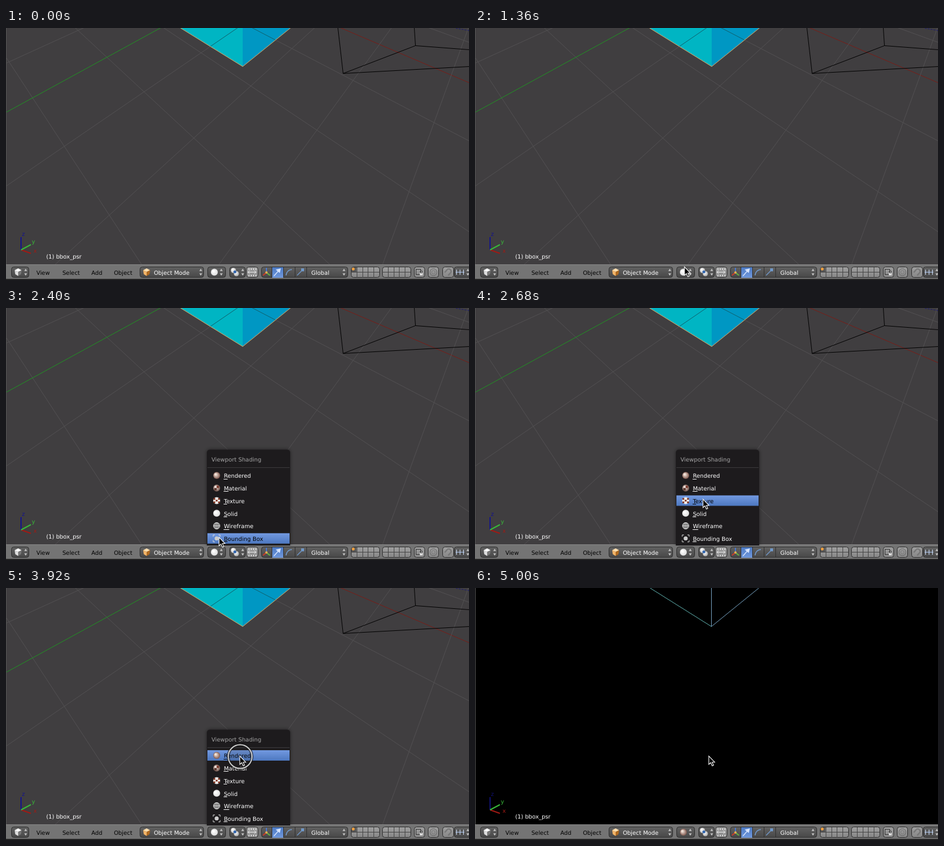
Recreate the animation shown at these times as an HTML page with a canvas. Size 800 by 435 pixels, loop 5040 ms.

```html
<!DOCTYPE html>
<html lang="en">
<head>
<meta charset="utf-8">
<title>Viewport shading menu</title>
<style>
html, body { margin: 0; width: 100%; height: 100%; overflow: hidden; background: #000; }
canvas { display: block; }
</style>
</head>
<body>
<canvas id="stage" width="800" height="435"></canvas>
<script>
const c = document.getElementById('stage').getContext('2d');
const LOOP = 5040, STEP = 40;
const MENU_OPEN = 1880, RENDERED = 3960, VIEW_SYNCED = 4200;
const CLICKS = [[1840, 2080], [3800, 3960]];
const ITEMS = ['Rendered', 'Material', 'Texture', 'Solid', 'Wireframe', 'Bounding Box'];
// Cursor moves: start, end, from x, y, to x, y
const MOVES = [
  [300, 1400, 606.7, -11, 361, 414],
  [2280, 2680, 361, 414, 394, 330],
  [2800, 3280, 394, 330, 404, 290]
];

function path(points, closed) {
  c.beginPath();
  for (let i = 0; i < points.length; i += 2) c.lineTo(points[i], points[i + 1]);
  if (closed) c.closePath();
}
function line(color, points, width = 1) {
  path(points);
  c.strokeStyle = color;
  c.lineWidth = width;
  c.stroke();
}
function poly(color, points) {
  path(points, true);
  c.fillStyle = color;
  c.fill();
}
function rect(color, x, y, w, h) {
  c.fillStyle = color;
  c.fillRect(x, y, w, h);
}
function disc(color, x, y, r) {
  c.beginPath();
  c.arc(x, y, r, 0, 7);
  c.fillStyle = color;
  c.fill();
}
function ring(color, x, y, r, width = 1, from = 0, to = 7) {
  c.beginPath();
  c.arc(x, y, r, from, to);
  c.strokeStyle = color;
  c.lineWidth = width;
  c.stroke();
}
function text(s, x, y, color) {
  c.font = '9.8px "DejaVu Sans", sans-serif';
  c.textRendering = 'geometricPrecision';
  c.fillStyle = color;
  c.fillText(s, x + 0.4, y);
}
function gradient(y, h, top, bottom) {
  const g = c.createLinearGradient(0, y, 0, y + h);
  g.addColorStop(0, top);
  g.addColorStop(1, bottom);
  return g;
}
function sphere(x, y, r, light, dark) {
  const g = c.createRadialGradient(x - 2, y - 2, 1, x, y, r);
  g.addColorStop(0, light);
  g.addColorStop(1, dark);
  disc(g, x, y, r);
}

// Floor grid: two fans of lines from vanishing points on one horizon
function grid(color, xAxis = color, yAxis = color) {
  const fan = (x, slope, tint) => line(tint, [x, -363, x + 900 * slope, 537]);
  for (let k = 0; k < 6; k++) {
    fan(-271, 0.655 + 0.422 * k, k == 4 ? xAxis : color);
    fan(930, 0.367 * k - 2.198, k == 1 ? yAxis : color);
  }
}
function solidView() {
  grid('#525052', '#781d17', '#1f9422');
  const cube = [301, -0.5, 408.5, 66, 491, -0.5];
  poly('#00b5c3', [...cube.slice(0, 4), 408.5, -0.5]);
  poly('#0097c3', [408.5, -0.5, ...cube.slice(2)]);
  c.save();
  path(cube, true);
  c.clip();
  grid('#10606c');
  c.restore();
  line('#dcab68', cube);
  line('#000', [573, -0.5, 582, 78, 707, 30, 705, -0.5]);
  line('#000', [707, 30, 800, 37]);
  line('#000', [582, 78, 800, 66]);
  c.setLineDash([3, 2]);
  line('#191970', [777, 0, 800, 4]);
  c.setLineDash([]);
}
function renderedView(synced) {
  if (synced) {
    line('#5fb0ae', [302, -0.5, 408, 66]);
    line('#78a4c4', [408, -0.5, 408, 66, 490, -0.5]);
  } else {
    line('#46585f', [234, -0.5, 242, 43, 440, 149]);
    line('#465068', [242, 43, 306, -0.5]);
    line('#465a66', [444, -0.5, 440, 149, 548, 6]);
    line('#465078', [528, -0.5, 548, 6, 549, -0.5]);
  }
}
function viewport(rendered, synced) {
  rect(rendered ? '#000' : '#403e40', 0, 0, 800, 408);
  c.save();
  c.translate(0.5, 0.5);
  if (rendered) renderedView(synced);
  else solidView();
  c.restore();

  const blue = rendered ? '#101070' : '#14148c';
  rect('#555', 0, 0, 1, 408);
  line(blue, [26, 383, 26, 361], 2);
  line('#a01a14', [26, 383, 43, 389], 2);
  line('#38b838', [26, 383, 43, 374], 2);
  text('z', 27, 359, blue);
  text('y', 44, 372, '#38b838');
  text('x', 47, 388, '#a01a14');
  text('(1) bbox_psr', 69, 398, '#fff');
}

function shadingIcon(kind, x, y) {
  if (kind == 'Rendered') sphere(x, y, 6, '#f4e6dc', '#7e564c');
  if (kind == 'Solid') sphere(x, y, 6, '#fff', '#ddd');
  if (kind == 'Material') {
    sphere(x, y, 6, '#f0e4de', '#74584f');
    rect('#7c3c30', x, y - 4, 4, 4);
    rect('#5c3830', x - 4, y, 4, 4);
  }
  if (kind == 'Texture') {
    disc('#eee', x, y, 6);
    for (const [dx, dy] of [[0, 0], [-4, -3], [4, -3], [-4, 3], [4, 3]])
      rect('#80341f', x + dx - 1.5, y + dy - 1.5, 3, 3);
  }
  if (kind == 'Wireframe') {
    disc('#555', x, y, 6);
    ring('#ddd', x, y, 5.5);
    line('#ddd', [x, y - 6, x, y + 6]);
    line('#ddd', [x - 6, y, x + 6, y]);
    c.beginPath();
    c.ellipse(x, y, 3, 5.5, 0, 0, 7);
    c.stroke();
  }
  if (kind == 'Bounding Box') {
    disc('#ccc', x, y, 3.5);
    for (const sx of [-1, 1]) for (const sy of [-1, 1])
      line('#ddd', [x + 3 * sx, y + 6 * sy, x + 6 * sx, y + 6 * sy, x + 6 * sx, y + 3 * sy]);
  }
}
function menu(px, py) {
  c.save();
  c.beginPath();
  c.rect(0, 0, 800, 410);
  c.clip();
  c.shadowColor = 'rgba(0,0,0,.5)';
  c.shadowBlur = 6;
  c.beginPath();
  c.roundRect(347, 244.5, 144, 166, [5, 5, 0, 0]);
  c.fillStyle = '#1d1b1d';
  c.fill();
  c.restore();
  text('Viewport Shading', 354.6, 265, '#a5a5a5');
  rect('#3c3b3d', 348, 275, 142, 1);
  ITEMS.forEach((label, i) => {
    const y = 289.5 + 21.75 * i;
    const hot = Math.abs(py - y) < 10.9 && px > 347;
    const color = hot ? '#000' : '#fff';
    if (hot) rect(gradient(y - 9.5, 18, '#7299e0', '#4d78c0'), 348, y - 9.5, 142, 18);
    shadingIcon(label, 364, y - 0.5);
    text(label, 376, y + 3.8, color);
    rect(color, 376, Math.round(y + 5), c.measureText(label[0]).width, 1);
  });
}

function button(x, w, top = '#626262', bottom = '#494949') {
  c.beginPath();
  c.roundRect(x + 0.5, 412.5, w, 18, 4);
  c.fillStyle = gradient(412, 18, top, bottom);
  c.fill();
  c.strokeStyle = '#2c2c2c';
  c.lineWidth = 1;
  c.stroke();
}
function toggle(x, w) { button(x, w, '#a0a0a0', '#888'); }
function arrows(x) {
  for (const s of [-1, 1])
    poly('#c4c4c4', [x - 2.5, 421.5 + 2 * s, x + 2.5, 421.5 + 2 * s, x, 421.5 + 6 * s]);
}
function cubeIcon(x, left, top, right) {
  poly(top, [x - 6, 418, x, 415, x + 6, 418, x, 421]);
  poly(left, [x - 6, 418, x, 421, x, 428, x - 5, 425]);
  poly(right, [x + 6, 418, x, 421, x, 428, x + 5, 425]);
}
function layers(x) {
  toggle(x, 49);
  for (let i = 1; i < 5; i++) rect('#444', x + Math.round(i * 9.8), 413, 1, 18);
  rect('#444', x, 421, 49, 1);
}
function header(shading) {
  rect('#747474', 0, 408, 800, 25);
  rect('#888', 0, 408, 800, 1);
  rect('#262626', 0, 433, 800, 2);

  button(9, 30);
  cubeIcon(21, '#ddd', '#fff', '#777');
  arrows(34);
  [['View', 52], ['Select', 97], ['Add', 147], ['Object', 186]]
    .forEach(([s, x]) => text(s, x, 425.5, '#000'));

  button(231, 110);
  cubeIcon(243, '#f2b468', '#ffe0b0', '#b06a20');
  text('Object Mode', 255, 425.5, '#fff');
  arrows(336.5);

  button(348, 31);
  shadingIcon(shading, 360, 421.5);
  arrows(372);

  button(386, 27);
  sphere(393, 418.5, 4.5, '#fff', '#bbb');
  sphere(398, 424, 4.5, '#fff', '#aaa');
  disc('#3468b0', 395.5, 421, 2.5);
  arrows(409);
  toggle(415, 20);
  for (let i = 0; i < 4; i++) {
    rect('#eee', 419 + i * 4, 415, 1.5, 2.5);
    rect('#eee', 419 + i * 4, 426, 1.5, 2.5);
  }
  line('#eee', [421, 418.5, 418, 421.5, 421, 424.5]);
  line('#eee', [429, 418.5, 432, 421.5, 429, 424.5]);
  line('#eee', [418, 421.5, 432, 421.5]);

  button(441, 149);
  line('#4a78d0', [450, 422, 450, 414], 2);
  line('#d03a28', [450, 422, 444, 427], 2);
  line('#60b840', [450, 422, 456, 427], 2);
  disc('#e8b050', 450, 422, 2);
  rect(gradient(413, 18, '#4c7ac4', '#7098dc'), 460, 413, 19, 18);
  line('#d5e4ff', [463, 428, 471, 419], 1.5);
  poly('#d5e4ff', [475, 415, 466, 417, 473, 423]);
  ring('#7098c8', 494, 427, 10, 1.5, Math.PI, Math.PI * 1.5);
  line('#7098c8', [503, 427, 512, 418], 1.5);
  rect('#7098c8', 510, 415, 5, 5);
  for (const x of [459, 479, 499, 519]) rect('#303030', x, 413, 1, 18);
  text('Global', 527, 425.5, '#fff');
  arrows(584);

  layers(596);
  rect('#555', 597, 413, 8.5, 8);
  disc('#f0a040', 600, 416, 2.5);
  layers(650);

  toggle(705, 18);
  c.strokeStyle = '#333';
  c.strokeRect(708.5, 416.5, 8, 9);
  rect('#ddd', 715, 422, 5, 5);
  ring('#444', 717.5, 421, 2);
  toggle(729, 18);
  ring('#666', 738.5, 421.5, 6);
  ring('#777', 738.5, 421.5, 3);
  toggle(754, 19);
  ring('#777', 765, 420, 4, 2.5, -2.4, 0.8);
  line('#777', [762, 417.5, 758, 422], 2.5);
  line('#777', [768, 423, 764, 427], 2.5);
  button(774, 40);
  line('#a8c4f0', [777, 421.5, 792, 421.5]);
  for (const x of [778.5, 784.5, 790.5]) line('#d0e0fa', [x, 417, x, 426]);
  arrows(798);
}

function cursorAt(t) {
  const [t0, t1, x0, y0, x1, y1] = MOVES.filter(m => t >= m[0]).pop();
  const u = Math.min((t - t0) / (t1 - t0), 1), s = u * u * (3 - 2 * u);
  return [x0 + (x1 - x0) * s, y0 + (y1 - y0) * s];
}
function pointer(x, y) {
  c.save();
  c.translate(x, y);
  path([0, 0, 0, 14.5, 3.3, 11.5, 5.8, 17, 8.2, 16, 5.8, 10.7, 10.2, 10.7], true);
  c.fillStyle = '#000';
  c.fill();
  c.strokeStyle = '#fff';
  c.lineWidth = 1.1;
  c.stroke();
  c.restore();
}
function clickRing(x, y) {
  disc('rgba(40,40,40,.15)', x, y, 21);
  ring('rgba(20,20,20,.6)', x, y, 20.5, 5);
  ring('#ccc', x, y, 20.5, 2);
}

function draw(now) {
  const t = Math.floor(now % LOOP / STEP) * STEP;
  const rendered = t >= RENDERED;
  const visible = t >= MOVES[0][0];
  const [x, y] = visible ? cursorAt(t) : [0, 0];
  viewport(rendered, t >= VIEW_SYNCED);
  header(rendered ? 'Rendered' : 'Solid');
  if (t >= MENU_OPEN && !rendered) menu(x, y);
  if (CLICKS.some(([from, to]) => t >= from && t < to)) clickRing(x + 0.5, y + 1);
  if (visible) pointer(x, y);
}

const start = performance.now();
function tick() {
  draw(performance.now() - start);
  requestAnimationFrame(tick);
}
tick();
</script>
</body>
</html>
```
